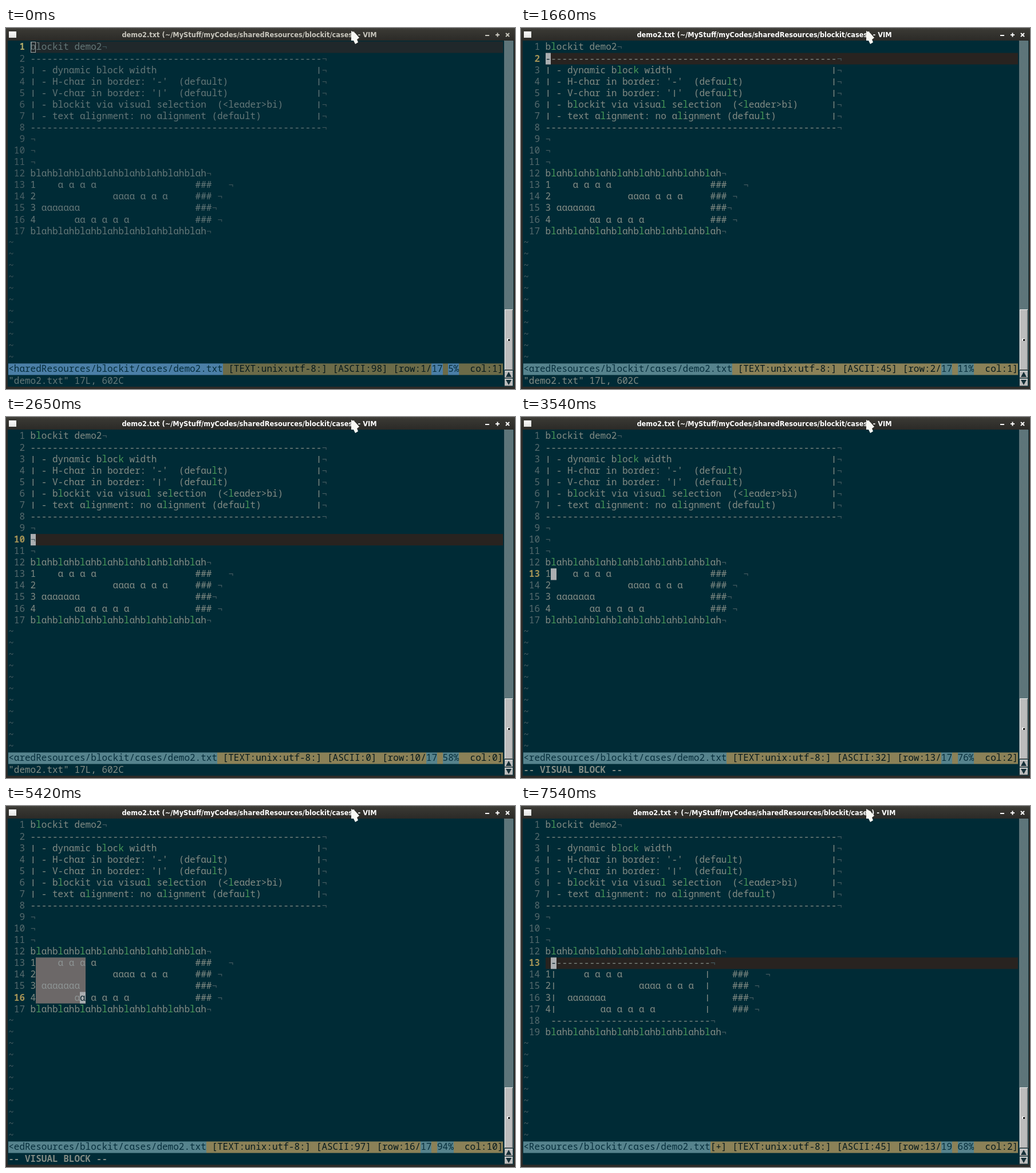
Write an HTML page with a canvas that moves like this. It is 889x630 px and loops after 8000 ms.

```html
<!DOCTYPE html>
<html lang="en">
<head>
<meta charset="utf-8">
<title>blockit demo</title>
<style>
html, body { margin: 0; width: 100%; height: 100%; overflow: hidden; background: #002b36; }
canvas { display: block; }
</style>
</head>
<body>
<canvas id="stage" width="889" height="630"></canvas>
<script>
const ctx = document.getElementById('stage').getContext('2d');
const LOOP = 8000, CELL_W = 9.6, CELL_H = 20.072, LEFT = 4.2, TOP = 23.45;
const COLUMNS = 90, TEXT_ROWS = 28, GUTTER = 4;
const MONO = '16px "Noto Sans Mono", monospace';
const MONO_BOLD = 'bold ' + MONO;
const DIRECTORY = '~/MyStuff/myCodes/sharedResources/blockit/cases';

const BLURRED = {
  text: '#647778', dim: '#3d5459', number: '#4a6065', current: '#b0a968', line: '#20282b',
  path: '#4b7fa7', bar: '#6c6b48', title: '#c8c6bd', tint: '#647778'
};
const FOCUSED = {
  text: '#828b84', dim: '#465c61', number: '#576b6e', current: '#a39356', line: '#282320',
  path: '#56838d', bar: '#8b8157', title: '#ffffff', tint: '#489a58'
};
const SELECTION = '#6c6868', SELECTED_TEXT = '#8d9494', CURSOR = '#aaaeb1', INK = '#06222b';

// Document before and after the block command
const boxed = s => ('| - ' + s).padEnd(52) + '|';
const rule = '-'.repeat(53);
const blah = 'blah'.repeat(8);
const tableRow = (label, column, letters, trailing) =>
  (label + ' '.repeat(column - 2) + letters).padEnd(30) + '###' + ' '.repeat(trailing);
const table = [
  tableRow('1', 6, 'a a a a', 3),
  tableRow('2', 16, 'aaaa a a a', 1),
  tableRow('3', 3, 'aaaaaaa', 0),
  tableRow('4', 9, 'aa a a a a', 1)
];
const heading = [
  'blockit demo2', rule,
  boxed('dynamic block width'),
  boxed("H-char in border: '-'  (default)"),
  boxed("V-char in border: '|'  (default)"),
  boxed('blockit via visual selection  (<leader>bi)'),
  boxed('text alignment: no alignment (default)'),
  rule, '', '', '', blah
];
const edge = ' ' + '-'.repeat(29);
const plainDoc = [...heading, ...table, blah];
const blockDoc = [
  ...heading, edge,
  ...table.map(s => s[0] + '| ' + s.slice(1, 26) + ' |' + s.slice(26)),
  edge, blah
];

// Cursor path as [time, row, column]; held keys repeat every 40 ms, the screen every 50 ms
const path = [[0, 1, 1], [1660, 2, 1]];
[3, 4, 5, 6, 8, 9, 10, 12, 13].forEach((row, i) => path.push([Math.min(2320 + 50 * i, 2700), row, 1]));
path.push([2980, 13, 2], [3640, 14, 2], [3890, 15, 2], [4310, 16, 2], [4520, 16, 3]);
for (let i = 0; i <= 17; i++) path.push([5170 + 50 * i, 16, 4 + Math.floor(i * 50 / 40)]);
path.push([6300, 16, 26], [7490, 13, 2]);

function stateAt(t) {
  const [, row, col] = path.filter(p => p[0] <= t).pop();
  const done = t >= 7490;
  return {
    row, col, done,
    doc: done ? blockDoc : plainDoc,
    focused: t >= 380,
    visual: t >= 3540 && !done,
    titleChanged: t >= 7540,
    colors: t >= 380 ? FOCUSED : BLURRED
  };
}

const cellX = c => LEFT + c * CELL_W;
const rowY = r => TOP + (r - 1) * CELL_H;

function box(x, y, w, h, color) {
  ctx.fillStyle = color;
  ctx.fillRect(x, y, w, h);
}

function cells(row, from, count, color, rows = 1) {
  const x = Math.round(cellX(from));
  box(x, rowY(row), Math.round(cellX(from + count)) - x, rows * CELL_H, color);
}

// The terminal face has a single-storey a and a short bar
function write(text, row, column, color, font = MONO) {
  const x = cellX(column), y = Math.round(rowY(row) + 15);
  ctx.font = font;
  ctx.fillStyle = color;
  if (text === '|') ctx.fillRect(x + 4, y - 11, 1.4, 12);
  else ctx.fillText(text.replace(/a/g, 'ɑ'), x, y);
}

function polygon(points, color) {
  ctx.fillStyle = color;
  ctx.beginPath();
  points.forEach(([x, y]) => ctx.lineTo(x, y));
  ctx.fill();
}

const tile = document.createElement('canvas');
tile.width = tile.height = 2;
const tileCtx = tile.getContext('2d');
tileCtx.fillStyle = '#23474f';
tileCtx.fillRect(0, 0, 2, 2);
tileCtx.fillStyle = '#98a3a5';
tileCtx.fillRect(0, 0, 1, 1);
tileCtx.fillRect(1, 1, 1, 1);
const stipple = ctx.createPattern(tile, 'repeat');

function drawFrame(s) {
  box(0, 0, 889, 630, '#2d2b28');
  const shade = ctx.createLinearGradient(0, 0, 0, 22);
  shade.addColorStop(0, '#45443f');
  shade.addColorStop(0.15, '#393833');
  shade.addColorStop(1, '#2b2a27');
  box(0, 0, 889, 22, shade);
  box(3, 22, 884, 604, '#002b36');

  const icon = ctx.createLinearGradient(0, 6, 0, 18);
  icon.addColorStop(0, '#ffffff');
  icon.addColorStop(1, '#dededc');
  box(5, 6, 13, 11, icon);

  ctx.font = 'bold 11.4px "DejaVu Sans", sans-serif';
  ctx.textAlign = 'center';
  ctx.fillStyle = s.colors.title;
  ctx.fillText(`demo2.txt ${s.titleChanged ? '+ ' : ''}(${DIRECTORY}) - VIM`, 425, 16);
  ctx.textAlign = 'left';

  box(837, 12, 7, 2, s.colors.title);
  box(855, 11, 7, 2, s.colors.title);
  box(857.5, 8.5, 2, 7, s.colors.title);
  ctx.strokeStyle = s.colors.title;
  ctx.lineWidth = 2;
  ctx.beginPath();
  ctx.moveTo(873, 9); ctx.lineTo(879, 15);
  ctx.moveTo(879, 9); ctx.lineTo(873, 15);
  ctx.stroke();
}

function drawScrollbar() {
  box(870, 22, 17, 604, '#16383f');
  box(870, 22, 16, 575, stipple);
  box(871, 491, 14, 106, '#bcbcbc');
  box(871, 491, 14, 1, '#ededed');
  box(871, 491, 1, 106, '#ededed');
  box(884, 492, 1, 105, '#6a6a6a');
  box(871, 596, 14, 1, '#555555');
  box(875, 542, 4, 4, '#f4f4f4');
  box(877, 543, 3, 3, '#111111');
  for (const y of [598, 612]) {
    box(871, y, 14, 13, '#bcbcbc');
    box(871, y, 14, 1, '#ededed');
    box(871, y + 12, 14, 1, '#555555');
  }
  polygon([[878, 600], [883, 609], [873, 609]], '#173038');
  polygon([[873, 614], [883, 614], [878, 623]], '#173038');
}

function drawText(s) {
  const c = s.colors;
  if (s.visual) cells(13, GUTTER + 1, s.col - 1, SELECTION, s.row - 12);
  else cells(s.row, GUTTER, COLUMNS - GUTTER, c.line);
  if (s.focused) cells(s.row, GUTTER + s.col - 1, 1, CURSOR);

  for (let row = 1; row <= TEXT_ROWS; row++) {
    const line = s.doc[row - 1];
    if (line === undefined) {
      write('~', row, 0, c.dim);
      continue;
    }
    const current = row === s.row;
    write(String(row).padStart(3), row, 0, current ? c.current : c.number, current ? MONO_BOLD : MONO);
    [...line].forEach((ch, i) => {
      const col = i + 1;
      const selected = s.visual && row >= 13 && row <= s.row && col >= 2 && col <= s.col;
      let color = c.text;
      if (ch === 'l' || (ch === 'k' && line[col] === ' ')) color = c.tint;
      if (selected) color = SELECTED_TEXT;
      if (s.focused && current && col === s.col) color = INK;
      if (ch !== ' ') write(ch, row, GUTTER + i, color);
    });
    write('¬', row, GUTTER + line.length, c.dim);
  }

  if (!s.focused) {
    ctx.strokeStyle = '#a0a5a5';
    ctx.lineWidth = 1;
    ctx.strokeRect(43.5, 24.5, 8, 18);
  }
}

function drawStatus(s) {
  const c = s.colors, row = TEXT_ROWS + 1;
  const line = s.doc[s.row - 1], total = s.doc.length;
  const code = line ? line.charCodeAt(s.col - 1) : 0;
  const percent = Math.floor(100 * s.row / total) + '%';
  const parts = [
    [`${s.done ? '[+]' : ''} [TEXT:unix:utf-8:] [ASCII:${code}] [row:${s.row}/`, c.bar],
    [String(total), c.path], [' ', c.bar], [percent, c.path],
    [`  col:${line ? s.col : 0}]`, c.bar]
  ];
  const used = parts.reduce((n, p) => n + p[0].length, 0);
  const file = DIRECTORY + '/demo2.txt';
  parts.unshift(['<' + file.slice(file.length - (COLUMNS - used - 1)), c.path]);

  let column = 0;
  for (const [text, color] of parts) {
    cells(row, column, text.length, color);
    write(text, row, column, color === c.path ? '#052d3b' : '#05191d');
    column += text.length;
  }
  if (s.visual) write('-- VISUAL BLOCK --', row + 1, 0, c.text, MONO_BOLD);
  else if (!s.done) write('"demo2.txt" 17L, 602C', row + 1, 0, c.text);
}

function drawPointer() {
  polygon([[603, 5], [610, 9], [617, 17], [613, 20], [615, 25], [610, 28], [607, 22], [603, 22]], '#f8f8f4');
}

function render(now) {
  const s = stateAt(now % LOOP);
  drawFrame(s);
  drawScrollbar();
  drawText(s);
  drawStatus(s);
  drawPointer();
}

const start = performance.now();
function tick() {
  render(performance.now() - start);
  requestAnimationFrame(tick);
}
tick();
</script>
</body>
</html>
```
